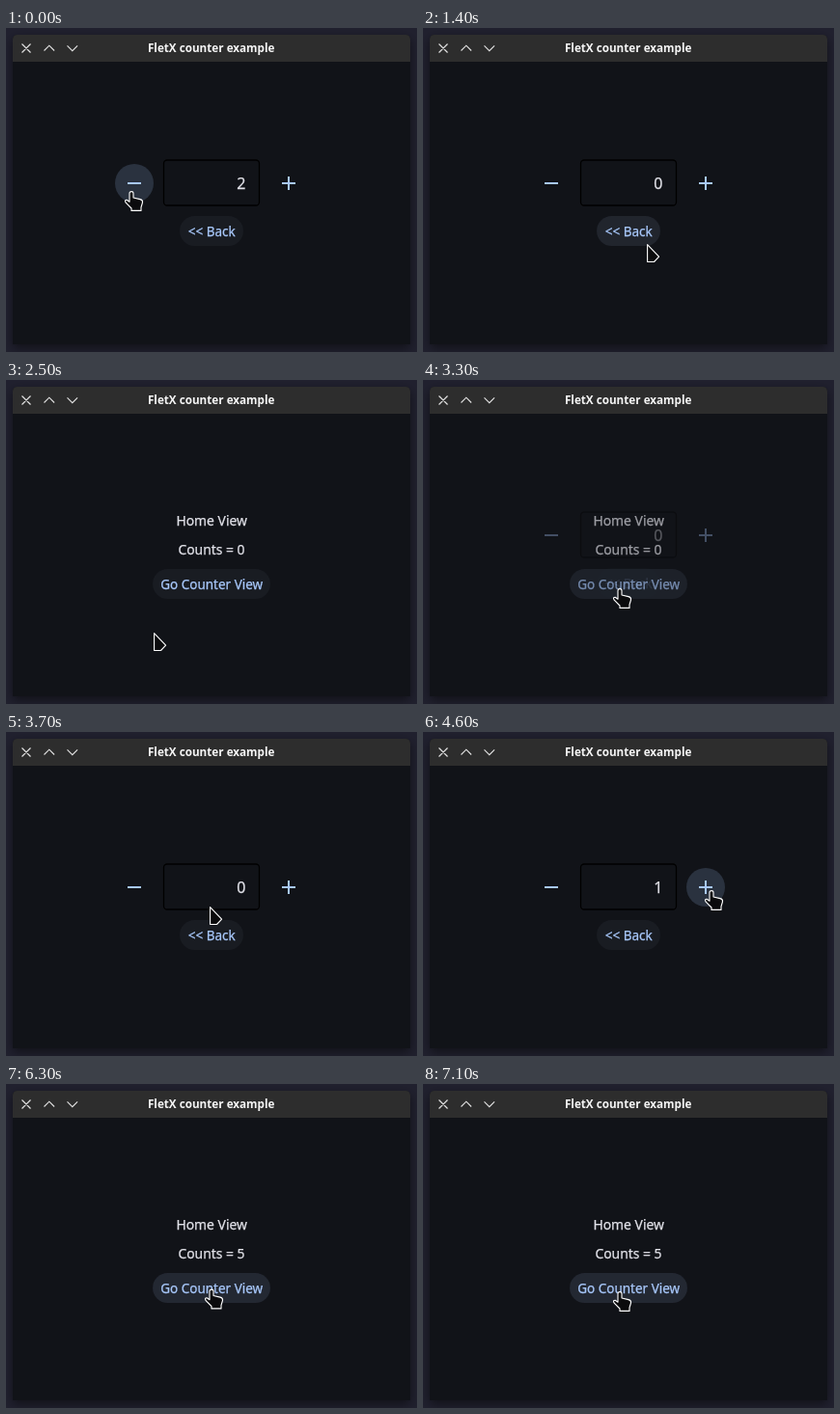
An HTML page that plays this animation: 426x336 px, repeating every 7200 ms.

```html
<!DOCTYPE html>
<html lang="en">
<head>
<meta charset="utf-8">
<title>Counter</title>
<style>
  html, body { margin: 0; width: 100%; height: 100%; overflow: hidden; background: #21212f; }
  svg { display: block; width: 426px; height: 336px; }
  .window { filter: drop-shadow(0 4px 6px rgba(0, 0, 0, .5)); }
  text { font: 13.9px "Noto Sans", "Open Sans", sans-serif; fill: #e2e2e9; stroke: #e2e2e9; stroke-width: .25; text-anchor: middle; }
  .title { font-size: 11.7px; font-weight: 700; fill: #f4f4f4; stroke: none; }
  .value { font-size: 16px; text-anchor: end; }
  .label { font-size: 13.5px; fill: #a8c8fb; stroke: #a8c8fb; }
  .icons { fill: none; stroke: #e4e4e4; stroke-width: 1.1; }
  .sign { stroke: #a8c8fb; stroke-width: 2; }
  .pill { fill: #191c22; }
  .hover { fill: #a8c8fb; }
  .cursor { fill: #0b0b0d; stroke: #fff; stroke-width: 1.1; stroke-linejoin: round; }
</style>
</head>
<body>
<svg viewBox="0 0 426 336">
  <g class="window">
    <path d="M7 328V12Q7 7 12 7H414Q419 7 419 12V328Z" fill="#111318"/>
    <path d="M7 35V12Q7 7 12 7H414Q419 7 419 12V35Z" fill="#2d2d2d"/>
  </g>
  <path class="icons" d="M16.5 16.5l9 9m0-9l-9 9M39.5 23.5l5.3-5.3 5.3 5.3M63.5 18.3l5.3 5.3 5.3-5.3"/>
  <text class="title" x="212.7" y="25">FletX counter example</text>

  <g id="counter">
    <rect id="minus" class="hover" x="113" y="141" width="40" height="40" rx="20"/>
    <rect id="plus" class="hover" x="273" y="141" width="40" height="40" rx="20"/>
    <path class="sign" d="M126 161h14M286 161h14M293 154v14"/>
    <rect x="163.5" y="137" width="99" height="47" rx="3.5" fill="none" stroke="#000" stroke-width="1.3"/>
    <text id="value" class="value" x="248.4" y="167"></text>
    <rect class="pill" x="180" y="195" width="66" height="31" rx="15.5"/>
    <rect id="back" class="hover" x="180" y="195" width="66" height="31" rx="15.5"/>
    <text class="label" x="213.2" y="216">&lt;&lt; Back</text>
  </g>

  <g id="home">
    <text x="213.2" y="151">Home View</text>
    <text id="total" x="213" y="181"></text>
    <rect class="pill" x="152" y="196" width="122" height="31" rx="15.5"/>
    <rect id="go" class="hover" x="152" y="196" width="122" height="31" rx="15.5"/>
    <text class="label" x="213.2" y="217">Go Counter View</text>
  </g>

  <path id="arrow" class="cursor" d="M.6 .6V18.5H7.5L12.6 13.2Z"/>
  <path id="hand" class="cursor" d="M-2 2.5Q-2 .6 0 .6T2 2.5V7L9 8.6Q12 9.4 11.5 12L10 17V20.4H0V18L-5.8 12.2Q-7.6 9.2-4.8 9.2L-2 11.2Z"/>
</svg>
<script>
const LOOP = 7200, STEP = 100;
const el = id => document.getElementById(id);
const clamp = (v, max = 1) => Math.max(0, Math.min(max, v));
const ramp = (t, start, length) => clamp((t - start) / length);
const show = (id, opacity) => el(id).setAttribute("opacity", opacity);

// the cursor reaches each stop at "at" and leaves it at "until"
const stops = [
  { at: 0, until: 900, x: 130, y: 169 },
  { at: 1400, x: 232, y: 224 },
  { at: 1700, until: 2000, x: 222, y: 212 },
  { at: 2500, x: 153, y: 262 },
  { at: 2900, until: 3300, x: 204, y: 216 },
  { at: 3700, x: 211, y: 181 },
  { at: 4200, until: 5500, x: 299, y: 164 },
  { at: 5700, x: 257, y: 197 },
  { at: 5900, until: 6100, x: 222, y: 210 },
  { at: 6500, x: 204, y: 215 }
];
const controls = [
  { id: "minus", tint: .17 }, { id: "plus", tint: .17 },
  { id: "back", tint: .07 }, { id: "go", tint: .07 }
];

function cursorAt(t) {
  const i = Math.max(0, stops.findLastIndex(s => s.at <= t));
  const a = stops[i], b = stops[i + 1] || a;
  const leave = a.until || a.at;
  const k = ramp(t, leave, b.at - leave || 1);
  return { x: a.x + (b.x - a.x) * k, y: a.y + (b.y - a.y) * k };
}

const homeAt = t => ramp(t, 1900, 300) - ramp(t, 3200, 300) + ramp(t, 5950, 350);

const countAt = t =>
  clamp(2 - Math.floor(t / 300), 2) + clamp(Math.floor((t - 4250) / 250), 5);

function isOver(id, t) {
  const page = homeAt(t) > .5 ? "home" : "counter";
  if (el(id).parentNode.id !== page) return false;
  const { x, y } = cursorAt(t);
  const box = el(id).getBBox(), inset = 4;
  return Math.abs(x - box.x - box.width / 2) < box.width / 2 - inset
      && Math.abs(y - box.y - box.height / 2) < box.height / 2 - inset;
}

// averaging the recent past makes the highlight fade in and out
function hoverAt(id, t) {
  const past = [0, 1, 2, 3].filter(k => isOver(id, t - k * 50));
  return past.length / 4;
}

function draw(t) {
  const home = homeAt(t), count = countAt(t), { x, y } = cursorAt(t);
  show("home", home);
  show("counter", 1 - home);
  el("value").textContent = count;
  el("total").textContent = "Counts = " + count;
  for (const { id, tint } of controls) show(id, tint * hoverAt(id, t));

  const pointing = controls.some(c => isOver(c.id, t));
  show("hand", +pointing);
  show("arrow", +!pointing);
  for (const id of ["arrow", "hand"]) el(id).setAttribute("transform", `translate(${x} ${y})`);
}

function tick() {
  draw(Math.floor(performance.now() % LOOP / STEP) * STEP);
  requestAnimationFrame(tick);
}
tick();
</script>
</body>
</html>
```
